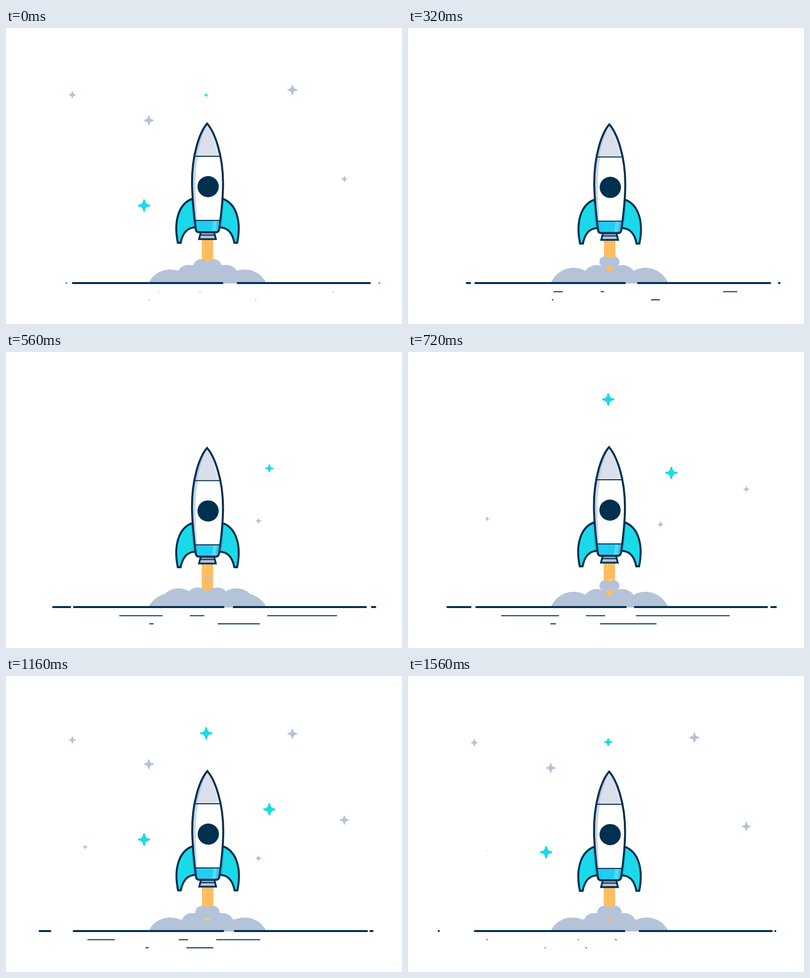
Animation, 800 px wide and 600 px high, one loop 1600 ms. Source, as an HTML page with a canvas:

```html
<!DOCTYPE html>
<html lang="en">
<head>
<meta charset="utf-8">
<title>Rocket launch</title>
<style>
  html, body { margin: 0; height: 100%; overflow: hidden; background: #fff; }
  canvas { display: block; }
</style>
</head>
<body>
<canvas id="stage" width="800" height="600"></canvas>
<script>
const ctx = document.getElementById('stage').getContext('2d');
const LOOP = 1600, STEP = 40, PUFF_LOOP = 400, STAR_LIFE = 1040, STAR_SCALE = 120;
const NAVY = '#00304f', CYAN = '#1adaea', GRAY = '#b4c3d8', ORANGE = '#ffbc60';

const clamp = v => Math.min(1, Math.max(0, v));
const mix = (a, b, k) => a + (b - a) * k;
const smooth = v => (v = clamp(v), v * v * (3 - 2 * v));
const sineOut = v => Math.sin(clamp(v) * Math.PI / 2);

// cubic-bezier(.65, 0, .35, 1), solved by bisection
function easeInOut(x) {
  let lo = 0, hi = 1;
  for (let i = 0; i < 24; i++) {
    const u = (lo + hi) / 2, v = 1 - u;
    if (1.95 * u * v * v + 1.05 * u * u * v + u ** 3 < x) lo = u; else hi = u;
  }
  return smooth(lo);
}

function fill(path, color) { ctx.fillStyle = color; ctx.fill(new Path2D(path)); }

function stroke(path, width, color = NAVY) {
  ctx.strokeStyle = color;
  ctx.lineWidth = width;
  ctx.stroke(new Path2D(path));
}

function disc(x, y, r, color) {
  ctx.fillStyle = color;
  ctx.beginPath();
  ctx.arc(x, y, r, 0, 7);
  ctx.fill();
}

function drawStar(t, color, x, y, birth, radius, speed) {
  const age = (t - birth + LOOP) % LOOP;
  const scale = clamp(Math.min(age, STAR_LIFE - age) / STAR_SCALE);
  if (!scale) return;
  ctx.save();
  ctx.translate(x, y + speed * age);
  ctx.scale(scale * radius, scale * radius);
  ctx.lineJoin = 'round';
  const shape = 'M0-.85Q.06-.06.85 0Q.06.06 0 .85Q-.06.06-.85 0Q-.06-.06 0-.85Z';
  fill(shape, color);
  stroke(shape, .3, color);
  ctx.restore();
}

// x, y at birth, birth time
const brightStars = [[404.5, 90.8, 600], [532, 231.2, 480], [279, 306, 760]];
// x, y at birth, birth time, radius, speed per ms
const paleStars = [
  [134, 126, 840, 7.2, .0125], [288.5, 171.2, 760, 9.8, .019],
  [578.5, 111, 840, 10, .019], [683.5, 275.5, 640, 9, .032],
  [160, 334.9, 550, 4.6, .019], [510, 335.7, 410, 6, .045]
];

function drawStars(t) {
  for (const [x, y, birth] of brightStars)
    drawStar(t, CYAN, x, y, birth, 12.6, .0371 + .000088 * y);
  for (const star of paleStars) drawStar(t, GRAY, ...star);
}

// start x, end x, y
const dashes = [
  [122, 62, 517], [754, 742, 517, -10],
  [308, 159.5, 534.5], [392, 344, 534.5], [661, 419.5, 534.5],
  [289.5, 277, 551], [504.5, 359.5, 551]
];

function drawGround(t) {
  const sway = (1 - Math.cos(2 * Math.PI * t / LOOP)) / 2;
  const head = easeInOut((t - 5) / 1050), tail = smooth((t - 520) / 1080);
  ctx.lineCap = 'round';
  const line = (x1, x2, y, width) => stroke(`M${x1} ${y}L${x2 + .01} ${y}`, width);
  line(135 + 3 * sway, 437 + 3 * sway, 517, 4);
  line(468 - 10 * sway, 735 - 10 * sway, 517, 4);
  ctx.globalAlpha = .5 + .5 * clamp(t / 80);
  for (const [from, to, y, drift = 10] of dashes) {
    const at = k => mix(from, to, k) + drift * sway;
    line(at(head), at(tail), y, y < 520 ? 4 : 2);
  }
  ctx.globalAlpha = 1;
  ctx.lineCap = 'butt';
}

function drawSmoke(t) {
  const pair = (d, y, r) => [-d, d].forEach(x => disc(407 + x, y, r, GRAY));
  ctx.save();
  ctx.beginPath();
  ctx.rect(0, 0, 800, 517.5);
  ctx.clip();
  pair(75, 538.5, 49);
  fill('M350 493.5H464V518H350Z', GRAY);
  for (let age = t % PUFF_LOOP; age < 1160; age += PUFF_LOOP) {
    if (age > 100 && age < 880) {
      // a puff forms in the flame, then sinks and swells
      const form = clamp((age - 100) / 220), swell = sineOut((age - 320) / 400);
      pair(.042 * (age - 100), 454 + 20 * form + 34.5 * swell, 11 * form + 17 * swell);
    }
    if (age >= 760) {
      // then rolls outwards into the side mounds
      const k = (age - 760) / 400, out = sineOut(k);
      pair(mix(33, 75, (k + out) / 2), mix(500, 538.5, k), mix(19, 49, out));
    }
  }
  ctx.restore();
}

function drawFlame(t) {
  fill('M395.5 428H418.5V494H395.5Z', ORANGE);
  if (t < 560 || t > 1300) return;
  ctx.globalAlpha = clamp((1300 - t) / 250);
  const drop = (t - 720) * .036;
  stroke(`M403 429V${444 + drop}`, 1.6, '#ffd98a');
  stroke(`M409 ${459 + drop * .7}V${466 + drop * .85}`, 2, '#ffd98a');
  ctx.globalAlpha = 1;
}

const HULL = 'M406.3 193.8C391 211 375.4 257 375.8 315C376.3 350 380.3 380 383.3 408' +
  'Q384.3 414 389.5 414H424.5Q429.5 414 430.5 408C434.5 380 438.5 350 438.5 315' +
  'C438.5 257 421.5 211 406.3 193.8Z';
const FIN = 'M377 346C348 356 338.4 393 347.2 435.5H352.8C357 415 366 404 384 404Z';

function drawFin() {
  fill(FIN, CYAN);
  ctx.save();
  ctx.clip(new Path2D(FIN));
  fill('M374 340H390V410H379Q374 380 374 340Z', '#18c6dd');
  ctx.restore();
  stroke(FIN, 4);
}

function drawRocket() {
  drawFin();
  ctx.save();
  ctx.translate(814.2, 0);
  ctx.scale(-1, 1);
  drawFin();
  ctx.restore();

  const nozzle = 'M393.5 414H420.5L424 428H390Z';
  fill(nozzle, GRAY);
  fill('M393.5 414H420.5L421.5 420H392.5Z', '#8fa1b9');
  stroke(nozzle, 3.6);
  stroke('M392 420H422', 2);

  ctx.save();
  ctx.clip(new Path2D(HULL));
  fill('M370 190H445V420H370Z', '#c9d6e5');
  fill('M406 190C398 220 383 260 383 315C383 350 385 380 388 414H445V190Z', '#fff');
  fill('M370 190H445V260H370Z', '#b8c6dc');
  fill('M405 196C398 215 390 235 386.5 260H445V190Z', '#dadfec');
  fill('M409 200C419 220 424 240 426 260H445V190Z', '#e2e6f0');
  fill('M370 390H445V420H370Z', '#22cdf2');
  fill('M370 390H386L389 414H370Z', '#1fbfe6');
  fill('M419 390H426L423.5 414H415.5Z', '#54d9f7');
  stroke('M370 260H445M370 390H445', 2);
  ctx.restore();
  stroke(HULL, 4);
  disc(408.3, 321.5, 21.5, NAVY);
}

// time, x, y
const shake = [
  [0, 0, 0], [160, 1, 1], [440, 0, 2], [720, -.2, -1], [1160, .4, -1], [1600, 0, 0]
];

function shakeAt(t) {
  const i = shake.findIndex(key => key[0] > t);
  const [t0, x0, y0] = shake[i - 1], [t1, x1, y1] = shake[i];
  const k = (t - t0) / (t1 - t0);
  return [mix(x0, x1, k), mix(y0, y1, k)];
}

function draw(now) {
  const t = Math.floor(now % LOOP / STEP) * STEP;
  ctx.clearRect(0, 0, 800, 600);
  drawStars(t);
  ctx.save();
  ctx.translate(...shakeAt(t));
  drawFlame(t);
  drawRocket();
  ctx.restore();
  drawSmoke(t);
  drawGround(t);
}

let start;
function tick(now) {
  start ??= now;
  draw(now - start);
  requestAnimationFrame(tick);
}
draw(0);
requestAnimationFrame(tick);
</script>
</body>
</html>
```
